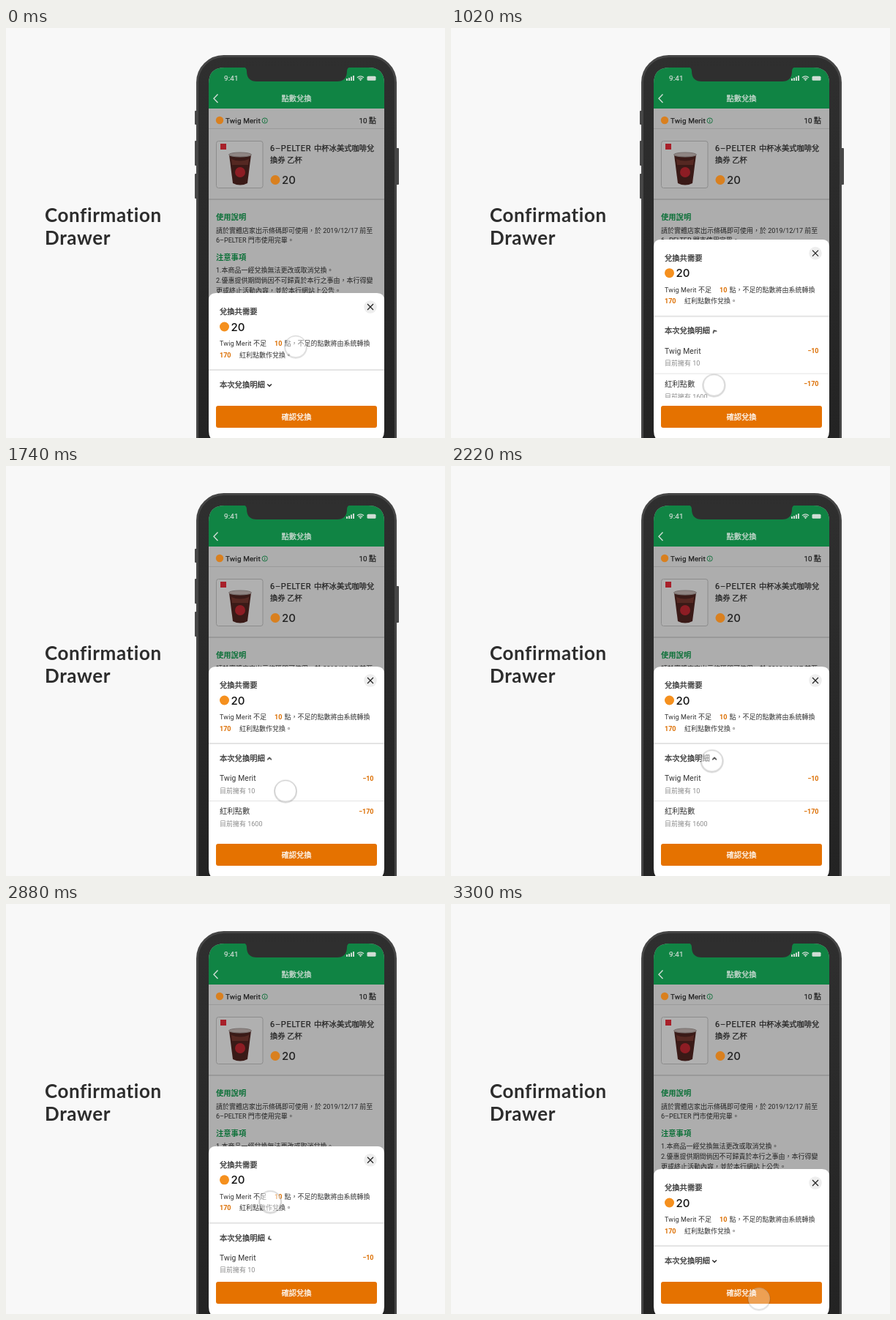
An HTML page for the animation above (3540 ms loop, 600 by 560 pixels).

```html
<!DOCTYPE html>
<html lang="zh-Hant">
<head>
<meta charset="utf-8">
<title>Confirmation Drawer</title>
<style>
  html, body { margin: 0; width: 100%; height: 100%; overflow: hidden; background: #f8f8f8; }
  svg { display: block; }
  text { font: 9px Roboto, "Noto Sans CJK TC", "Noto Sans CJK", sans-serif; fill: #333; }
  .dim text { fill: #222; }
  .dim .green { fill: #0c7038; }
  .dim .light { fill: #d0ddd5; stroke: #d0ddd5; }
  .head { font-size: 10.3px; stroke: #222; stroke-width: .25px; }
  .bold { font-size: 10.3px; font-weight: 700; }
  .row { font-size: 10.3px; }
  .top { font-size: 9.9px; }
  .name { letter-spacing: .15px; }
  .num { font: 500 15px Inter, sans-serif; fill: #111; }
  .amount { font-weight: 700; fill: #dc6e00; }
  .muted { fill: #8c8c8c; }
  .end { text-anchor: end; }
  .mid { text-anchor: middle; }
  .title { font: 700 26px Lato, sans-serif; letter-spacing: .6px; fill: #2d2d2d; }

  .drawer, .chevron, .touch { animation: 3540ms linear infinite; }
  .drawer { animation-name: slide; }
  .chevron { animation-name: flip; transform-box: fill-box; transform-origin: center; }
  .keys { animation: hide 3540ms step-end infinite; }
  .touch {
    offset-path: path("M396 435L361 486L359 488Q406.5 441 356 402Q392 430 421 539");
    offset-rotate: 0deg;
    animation-name: travel, fade;
  }
  @keyframes slide {
    0% { transform: translateY(0); }
    23.305% { transform: translateY(0); animation-timing-function: cubic-bezier(.65, 0, .35, 1); }
    31.78% { transform: translateY(-88px); }
    76.695% { transform: translateY(-88px); animation-timing-function: cubic-bezier(.65, 0, .35, 1); }
    85.169%, 100% { transform: translateY(0); }
  }
  @keyframes flip {
    0% { transform: rotate(0deg); }
    23.305% { transform: rotate(0deg); animation-timing-function: cubic-bezier(.65, 0, .35, 1); }
    31.78% { transform: rotate(180deg); }
    76.695% { transform: rotate(180deg); animation-timing-function: cubic-bezier(.65, 0, .35, 1); }
    85.169%, 100% { transform: rotate(0deg); }
  }
  @keyframes travel {
    0% { offset-distance: 0%; animation-timing-function: cubic-bezier(.65, 0, .35, 1); }
    16.1%, 19.49% { offset-distance: 19.4%; }
    32.2% { offset-distance: 20.25%; }
    38.98% { offset-distance: 20.25%; animation-timing-function: cubic-bezier(.65, 0, .35, 1); }
    59.32% { offset-distance: 51.8%; }
    77.54% { offset-distance: 51.8%; animation-timing-function: cubic-bezier(.76, 0, .24, 1); }
    93.22%, 100% { offset-distance: 100%; }
  }
  @keyframes fade {
    0% { opacity: .75; }
    6%, 87% { opacity: 1; }
    93.22%, 100% { opacity: .65; }
  }
  @keyframes hide {
    0% { opacity: 1; }
    55%, 100% { opacity: 0; }
  }
</style>
</head>
<body>
<svg width="600" height="560" viewBox="0 0 600 560">
  <linearGradient id="shell" x2="0" y2="1">
    <stop stop-color="#2f2f2f"/>
    <stop offset="1" stop-color="#222"/>
  </linearGradient>

  <text class="title" x="53" y="265">Confirmation</text>
  <text class="title" x="53" y="296">Drawer</text>

  <!-- phone -->
  <g class="keys" fill="#484848">
    <rect x="258" y="113" width="4" height="19" rx="1"/>
    <rect x="258" y="154" width="4" height="34" rx="1"/>
    <rect x="258" y="199" width="4" height="34" rx="1"/>
    <rect x="532" y="164" width="5" height="50" rx="1"/>
  </g>
  <rect x="261.500" y="38.500" width="271" height="570" rx="36" fill="url(#shell)" stroke="#464646" stroke-width="3"/>

  <!-- dimmed page -->
  <g class="dim">
    <path d="M277 560V76Q277 54 299 54H495Q517 54 517 76V560Z" fill="#adadad"/>
    <path d="M277 110V76Q277 54 299 54H495Q517 54 517 76V110Z" fill="#108444"/>
    <path d="M324 53Q329 54 329 59Q329 73 343 73H452Q466 73 466 59Q466 54 471 53Z" fill="#2f2f2f"/>

    <text class="light" x="298" y="72" style="font-size:9.8px;stroke-width:.2px;letter-spacing:.2px">9:41</text>
    <g fill="#d0ddd5">
      <path d="M465 69h2v3h-2zM468 68h2v4h-2zM471 66.500h2v5.500h-2zM474 65h2v7h-2z"/>
      <rect x="493.500" y="65.700" width="12" height="6" rx="1.500"/>
      <path d="M484.500 72.300l-1.700-1.900q1.700-1.300 3.400 0z"/>
    </g>
    <g fill="none" stroke="#d0ddd5" stroke-width="1.300">
      <path d="M480 67.800q4.500-3.800 9 0M481.700 69.600q2.800-2.300 5.600 0"/>
      <path d="M289.500 90.500L284 96.200l5.500 5.700" stroke-width="1.400"/>
    </g>
    <text class="head light mid" x="397" y="100">點數兌換</text>

    <circle cx="292" cy="126" r="5.200" fill="#d9801f"/>
    <text class="head top name" x="300" y="129.500">Twig Merit</text>
    <circle cx="353.700" cy="126.500" r="3.600" fill="none" stroke="#0c7038" stroke-width=".9"/>
    <path d="M353.700 124.300v1M353.700 126v2.600" stroke="#0c7038"/>
    <text class="head top end" x="506" y="129.500">10 點</text>
    <path d="M277 137.500H517" stroke="#9b9b9b"/>

    <rect x="287.500" y="154.500" width="63.500" height="64" rx="3" fill="#b0b0b0" stroke="#8c8c8c"/>
    <rect x="293" y="158" width="8" height="8" fill="#a8202a"/>
    <path d="M305 173L310 212Q320 217 330 212L335 173Z" fill="#3a1a17"/>
    <path d="M308 179L309 187L331 187L332 179Q320 184 308 179Z" fill="#552822"/>
    <ellipse cx="320" cy="173" rx="15.500" ry="3" fill="#8f8583" stroke="#77706e"/>
    <circle cx="320" cy="197" r="7" fill="#8d1d24"/>

    <text class="head" x="361" y="168" style="font-size:11px;letter-spacing:.7px">6–PELTER</text>
    <text class="head" x="421" y="168">中杯冰美式咖啡兌</text>
    <text class="head" x="361" y="184">換券 乙杯</text>
    <circle cx="368" cy="207.500" r="6.500" fill="#d9801f"/>
    <text class="num" x="377" y="213">20</text>
    <path d="M277 234H517" stroke="#999" stroke-width="2"/>

    <text class="bold green" x="287" y="262">使用說明</text>
    <text x="287" y="279.500">請於實體店家出示條碼即可使用，於 2019/12/17 前至</text>
    <text x="287" y="293">6–PELTER 門市使用完畢。</text>
    <text class="bold green" x="287" y="317">注意事項</text>
    <text x="287" y="333.500">1.本商品一經兌換無法更改或取消兌換。</text>
    <text x="287" y="347.700">2.優惠提供期間倘因不可歸責於本行之事由，本行得變</text>
    <text x="287" y="361.500">更或終止活動內容，並於本行網站上公告。</text>
  </g>

  <!-- drawer, drawn closed -->
  <g class="drawer">
    <path d="M277 660V372Q277 362 287 362H507Q517 362 517 372V660Z" fill="#fff"/>
    <circle cx="498" cy="381" r="8.800" fill="#eee"/>
    <path d="M494 377l8 8M502 377l-8 8" stroke="#222" stroke-width="1.200"/>
    <text class="head" x="292" y="391.200">兌換共需要</text>
    <circle cx="298.500" cy="408" r="6.500" fill="#f5901e"/>
    <text class="num" x="307.500" y="413.500">20</text>
    <text class="name" x="292" y="434">Twig Merit</text>
    <text x="338" y="434">不足</text>
    <text class="amount" x="367" y="434">10</text>
    <text x="380.500" y="434">點，不足的點數將由系統轉換</text>
    <text class="amount" x="292" y="449.500">170</text>
    <text x="319" y="449.500">紅利點數作兌換。</text>
    <path d="M277 467H517" stroke="#e4e4e4" stroke-width="2"/>
    <text class="head" x="292" y="490.800">本次兌換明細</text>

    <text class="row name" x="292" y="518">Twig Merit</text>
    <text class="amount end" x="502.500" y="517.500">−10</text>
    <text class="muted" x="292" y="534.500">目前擁有 10</text>
    <path d="M277 545.500H517" stroke="#e4e4e4"/>
    <text class="row" x="292" y="563">紅利點數</text>
    <text class="amount end" x="502.500" y="562.500">−170</text>
    <text class="muted" x="292" y="580">目前擁有 1600</text>
  </g>

  <!-- fixed footer -->
  <rect x="277" y="505" width="240" height="55" fill="#fff"/>
  <path d="M277 550Q277 556 279.500 560H277ZM517 550Q517 556 514.500 560H517Z" fill="#222"/>
  <rect x="287" y="516" width="220" height="30" rx="3" fill="#e57200"/>
  <text class="head mid" x="397" y="535" style="fill:#fff;stroke:#fff">確認兌換</text>

  <g class="touch">
    <circle cy=".8" r="15" fill="none" stroke="#000" stroke-opacity=".16" stroke-width="1.800"/>
    <circle r="14.700" fill="#fff" fill-opacity=".5" stroke="#bbb" stroke-opacity=".8" stroke-width=".8"/>
  </g>
  <g class="drawer">
    <path class="chevron" d="M357.300 486.500l2.800 2.700l2.800-2.700" fill="none" stroke="#222" stroke-width="1.400"/>
  </g>
</svg>
</body>
</html>
```
